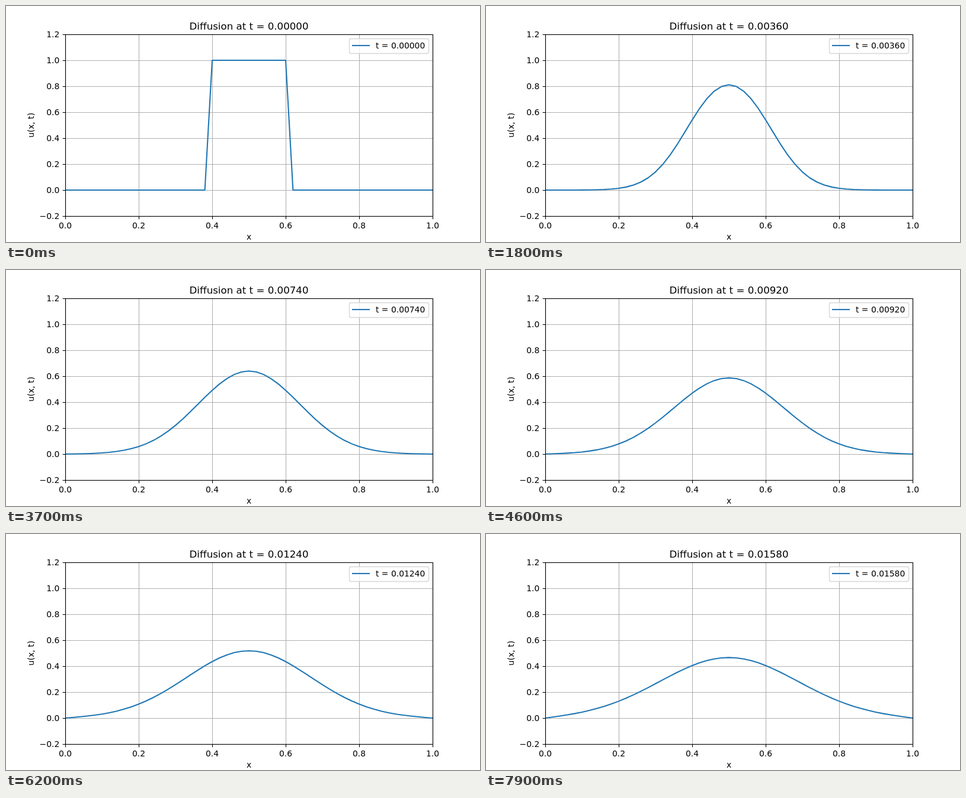
These frames come from a looping animation (800 px wide and 400 px high, 8 s). An HTML page:

```html
<!DOCTYPE html>
<html lang="en">
<head>
<meta charset="utf-8">
<title>Diffusion</title>
<style>
  html, body { margin: 0; width: 100%; height: 100%; overflow: hidden; background: #fff; }
  svg { display: block; }
  text { font: 13.889px "DejaVu Sans", sans-serif; font-variant-ligatures: none; text-anchor: middle; }
  #title { font-size: 16.667px; }
  .end { text-anchor: end; }
  #label { text-anchor: start; }
  .grid { stroke: #b0b0b0; stroke-width: 1.11; }
  .axis { stroke: #000; stroke-width: 1.11; fill: none; }
  .curve { stroke: #1f77b4; stroke-width: 2.083; fill: none; stroke-linejoin: round; stroke-linecap: square; }
</style>
</head>
<body>
<svg width="800" height="400" viewBox="0 0 800 400">
  <clipPath id="plot"><rect x="100" y="48" width="620" height="308"/></clipPath>
  <g id="scale"></g>
  <path id="curve" class="curve" clip-path="url(#plot)"/>
  <rect class="axis" x="100.5" y="48.5" width="620" height="308"/>
  <text id="title" x="410" y="40"></text>
  <text x="410" y="396">x</text>
  <text transform="translate(47 202) rotate(-90)">u(x, t)</text>
  <rect x="579.5" y="55.5" width="134" height="25" rx="2.8" fill="#fff" fill-opacity=".8"
        stroke="#ccc" stroke-opacity=".8" stroke-width="1.39"/>
  <path class="curve" d="M585 67H613"/>
  <text id="label" x="624" y="72"></text>
</svg>
<script>
const CELLS = 50, STEPS = 80, STEP_MS = 100, DT = 0.0002;
const R = DT * CELLS * CELLS;
const $ = id => document.getElementById(id);
const px = x => 100 + 620 * x;
const py = u => 312 - 220 * u;

// Grid lines, ticks and tick labels
const line = (cls, x1, y1, x2, y2) => `<path class="${cls}" d="M${x1} ${y1}L${x2} ${y2}"/>`;
const fixed = v => v.toFixed(1).replace('-', '\u2212');
let scale = '';
for (let i = 0; i <= 5; i++) {
  const x = px(i / 5) + 0.5;
  scale += line('grid', x, 48, x, 356) + line('axis', x, 356.5, x, 361.4)
    + `<text x="${x - 0.5}" y="377">${fixed(i / 5)}</text>`;
}
for (let i = -1; i <= 6; i++) {
  const y = py(i / 5) + 0.5;
  scale += line('grid', 100, y, 720, y) + line('axis', 95.6, y, 100.5, y)
    + `<text class="end" x="90.3" y="${y + 4.5}">${fixed(i / 5)}</text>`;
}
$('scale').innerHTML = scale;

// One backward Euler step with u = 0 at both ends (tridiagonal solve)
function diffuse(u) {
  const c = [0], d = [0], next = Array(CELLS + 1).fill(0);
  for (let i = 1; i < CELLS; i++) {
    const m = 1 + 2 * R - R * c[i - 1];
    c[i] = R / m;
    d[i] = (u[i] + R * d[i - 1]) / m;
  }
  for (let i = CELLS - 1; i > 0; i--) next[i] = d[i] + c[i] * next[i + 1];
  return next;
}

const states = [Array.from({ length: CELLS + 1 }, (_, i) => i >= 20 && i <= 30 ? 1 : 0)];
while (states.length < STEPS) states.push(diffuse(states[states.length - 1]));

let shown = -1;
function draw(step) {
  if (step === shown) return;
  shown = step;
  const time = 't = ' + (step * DT).toFixed(5);
  $('title').textContent = 'Diffusion at ' + time;
  $('label').textContent = time;
  const points = states[step].map((u, i) => px(i / CELLS).toFixed(2) + ' ' + py(u).toFixed(3));
  $('curve').setAttribute('d', 'M' + points.join('L'));
}

const start = performance.now();
function tick() {
  draw(Math.floor((performance.now() - start) / STEP_MS) % STEPS);
  requestAnimationFrame(tick);
}
tick();
</script>
</body>
</html>
```
